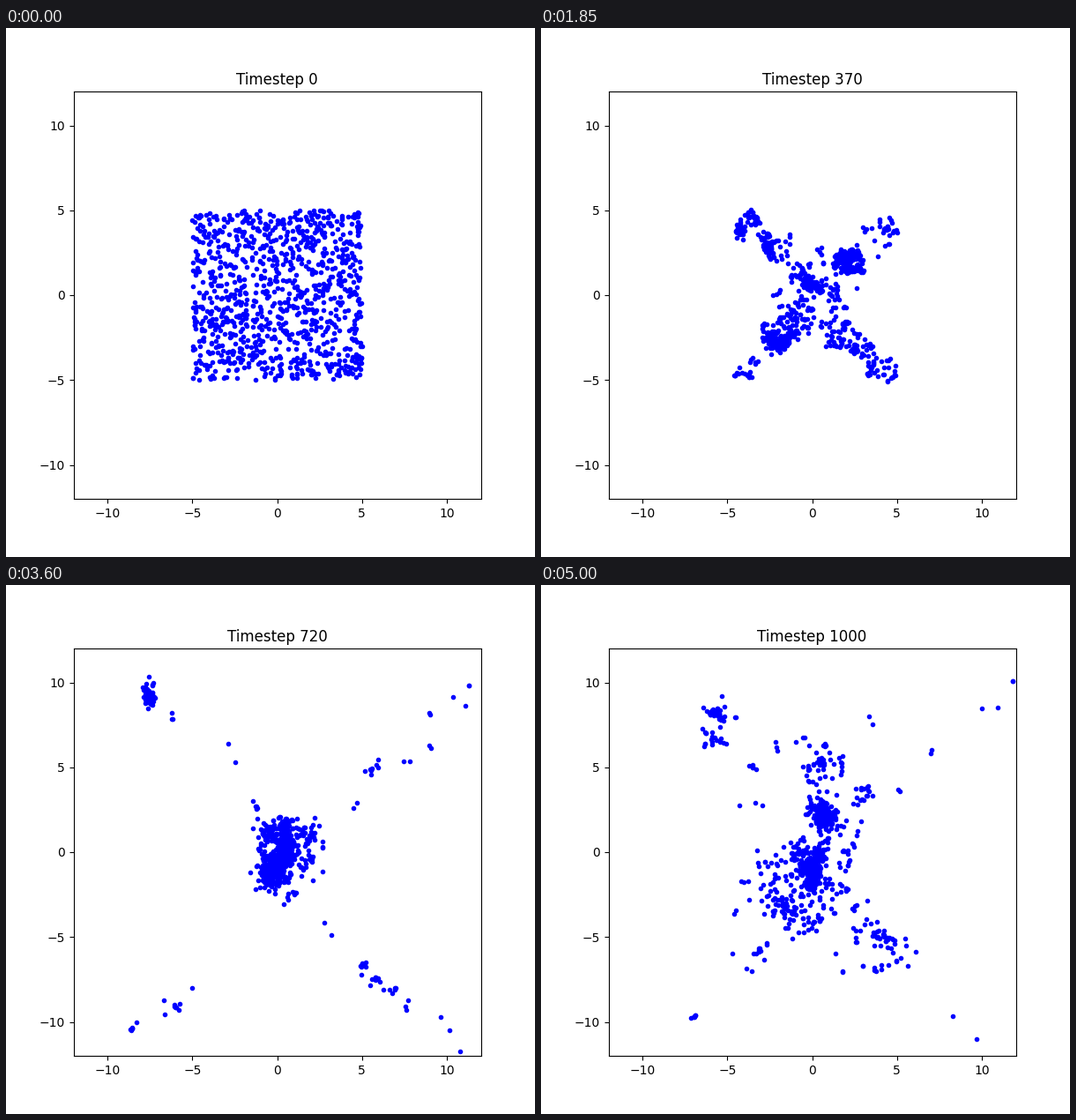
Recreate the animation shown at these times as a matplotlib script. Size 600 by 600 pixels, loop 5050 ms.

```python
import numpy as np
import matplotlib.pyplot as plt
from matplotlib.animation import FuncAnimation

N = 1000            # particles, released at rest in a square
HALF = 5            # half side of that square
FRAMES = 101
SUBSTEPS = 5        # integration steps per frame
DT = 10 / SUBSTEPS  # in timesteps, ten of which make a frame
MASS = 1e-6         # G * m, in units of length^2 / timestep^2
SOFT = 0.1          # softening length


def gravity(p):
    """Two-dimensional gravity: the pull falls off as 1 / r."""
    sq = (p * p).sum(axis=1)
    w = p @ p.T
    w *= -2
    w += sq[:, None] + SOFT ** 2
    w += sq
    np.reciprocal(w, out=w)
    return MASS * (w @ p - w.sum(axis=1)[:, None] * p)


def simulate():
    rng = np.random.RandomState(0)
    p = rng.uniform(-HALF, HALF, (N, 2)).astype(np.float32)
    v = np.zeros_like(p)
    acc = gravity(p)
    track = [p.copy()]
    for _ in range(FRAMES - 1):
        for _ in range(SUBSTEPS):
            v += acc * (DT / 2)
            p += v * DT
            acc = gravity(p)
            v += acc * (DT / 2)
        track.append(p.copy())
    return track


track = simulate()

fig, ax = plt.subplots(figsize=(6, 6), dpi=100)
ax.set_xlim(-12, 12)
ax.set_ylim(-12, 12)
ax.set_aspect("equal")
dots, = ax.plot([], [], "b.")
title = ax.set_title("Timestep 0")


def update(f):
    dots.set_data(*track[f].T)
    title.set_text(f"Timestep {10 * f}")
    return dots, title


anim = FuncAnimation(fig, update, frames=FRAMES, interval=50, repeat=True, repeat_delay=0)
plt.show()
```
